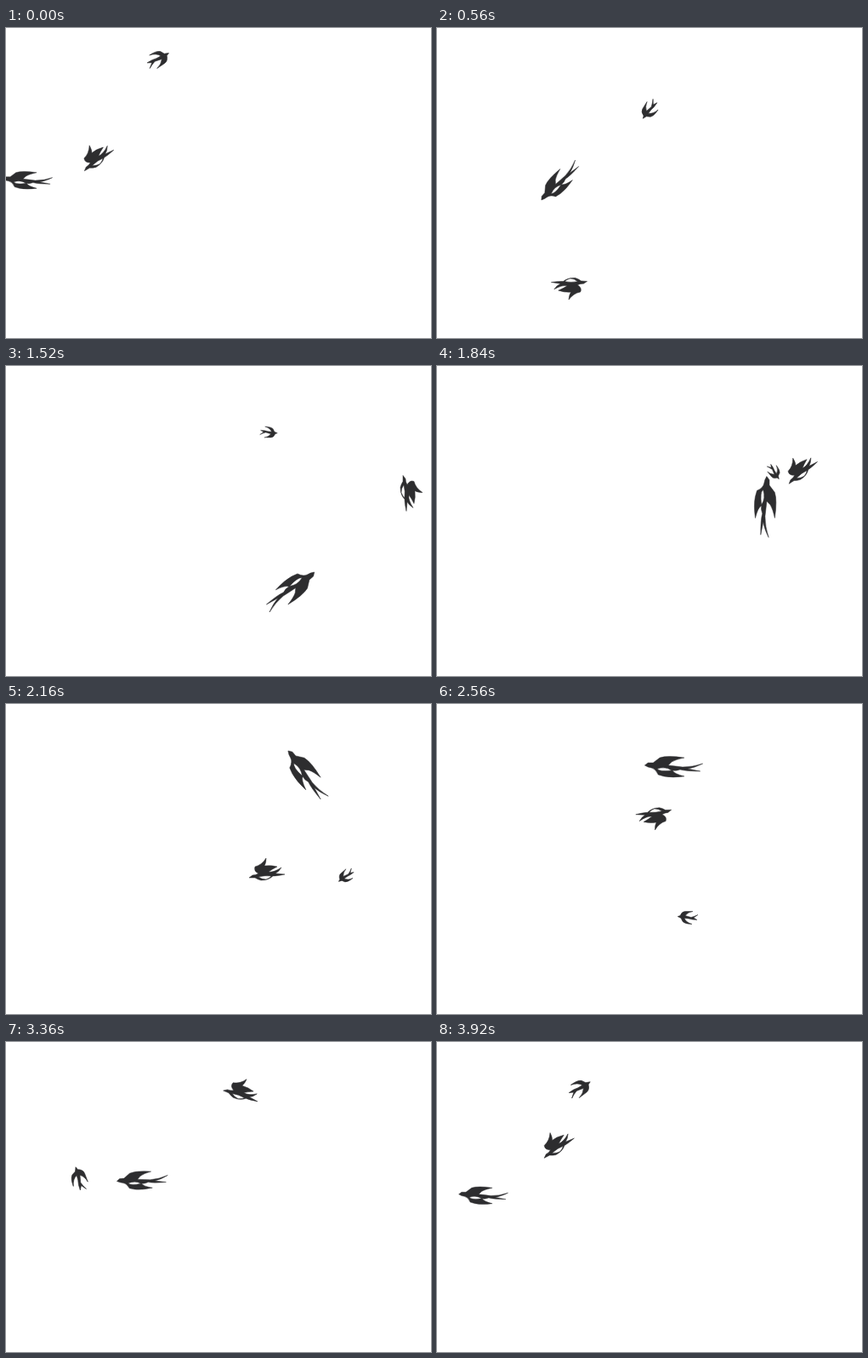
Write an HTML page with a canvas that moves like this. It is 500 by 364 pixels and loops after 4000 ms.

```html
<!DOCTYPE html>
<html lang="en">
<head>
<meta charset="utf-8">
<title>Swallows</title>
<style>
  html, body { margin: 0; width: 100%; height: 100%; overflow: hidden; background: #fff; }
  canvas { display: block; }
</style>
</head>
<body>
<canvas id="stage" width="500" height="364"></canvas>
<script>
const STEP_MS = 80, LOOP = 50;
const TIMES = [0, 7, 13, 19, 27, 32, 42, 49];
const ctx = document.getElementById('stage').getContext('2d');

const steady = value => () => value;
const wave = (mid, swing, peak) => step =>
  mid + swing * Math.cos((step - peak) / LOOP * 2 * Math.PI);

// Shapes face left. Each pose is x, y and heading (0 left, 90 up), passed at the matching time.
const birds = [
  {
    shape: new Path2D('M-35-2L-31-5L-25-5L-17-11Q-8-14 12-11Q2-9-3-6L-7-2Q2-1 10 0Q22 0 34-4Q24 1 16 2L31 5Q14 5 7 3' +
      'Q2 5-2 4Q0 8 12 11Q-2 13-12 11L-19 9Q-22 2-27 1L-31 0Z M-20 2Q-17 6-3 4Q-10-1-20 2Z'),
    size: wave(0.94, 0.1, 23.7),
    speed: wave(32, 17, 9),
    lean: 0,
    poses: [[26, 179, 0], [145, 180, 312], [120, 306, 180], [334, 263.5, 140],
            [353.5, 84, 50], [279, 74, 0], [161, 162.5, -5], [55, 180.5, 0]]
  },
  {
    shape: new Path2D('M-21 9L-17 6Q-13 6-10 4Q-16 1-14-4Q-6-6-1-14Q-1-8-3-5Q5-6 12-4Q6-1 2 2Q8 3 17-3Q14 2 10 4' +
      'L21 5Q12 7 7 7Q2 12-7 12Q-11 11-14 9Z M-10 8Q-6 11-1 11Q4 9 5 7Q-2 6-10 8Z'),
    size: steady(1),
    speed: steady(45),
    lean: 11,
    poses: [[106, 149.5, -41], [155, 305, 173], [385, 278, 155], [476, 149.5, 79],
            [307, 195, -11], [255, 134, 167], [278.5, 57, 12], [140.5, 118.5, -39]]
  },
  {
    shape: new Path2D('M-12-1L-9-2Q-7-7-3-7L6-7Q0-6-3-2L4 0Q8-1 12-3L7 .5L11 3Q5 3 1 1.5L-4 1Q-2 6 5 8Q-3 8-6 5L-8 1L-10 0Z'),
    size: wave(1.03, 0.18, 46.2),
    speed: steady(24),
    lean: 0,
    poses: [[179, 36.5, 146], [250, 96, 302], [192, 100, 120], [309, 78, 180],
            [400, 202, 319], [295, 250.5, 0], [86, 160.5, 69], [168, 54.5, 143]]
  }
];

// Cubic Hermite curve between two poses; the bird faces along its tangent.
function place(bird, step) {
  const i = TIMES.findLastIndex(time => time <= step), next = (i + 1) % TIMES.length;
  const start = TIMES[i], end = TIMES[next] || LOOP, span = end - start;
  const from = bird.poses[i], to = bird.poses[next];
  const u = (step - start) / span, v = 1 - u;
  const pull = (pose, time, trig) => -trig(pose[2] * Math.PI / 180) * bird.speed(time) * span;
  const [[x, dx], [y, dy]] = [Math.cos, Math.sin].map((trig, axis) => {
    const a = from[axis], b = to[axis];
    const p = pull(from, start, trig), q = pull(to, end, trig);
    return [
      v * v * (1 + 2 * u) * a + u * u * (1 + 2 * v) * b + u * v * (v * p - u * q),
      6 * u * v * (b - a) + v * (v - 2 * u) * p + u * (u - 2 * v) * q
    ];
  });
  ctx.translate(x, y);
  ctx.rotate(Math.atan2(-dy, -dx) + bird.lean * Math.PI / 180);
  ctx.scale(bird.size(step), bird.size(step));
}

function draw() {
  const step = Math.floor(performance.now() / STEP_MS) % LOOP;
  ctx.clearRect(0, 0, 500, 364);
  ctx.fillStyle = ctx.strokeStyle = '#2d2d2f';
  ctx.lineWidth = 0.5;
  for (const bird of birds) {
    ctx.save();
    place(bird, step);
    ctx.fill(bird.shape, 'evenodd');
    ctx.stroke(bird.shape);
    ctx.restore();
  }
  requestAnimationFrame(draw);
}
draw();
</script>
</body>
</html>
```
